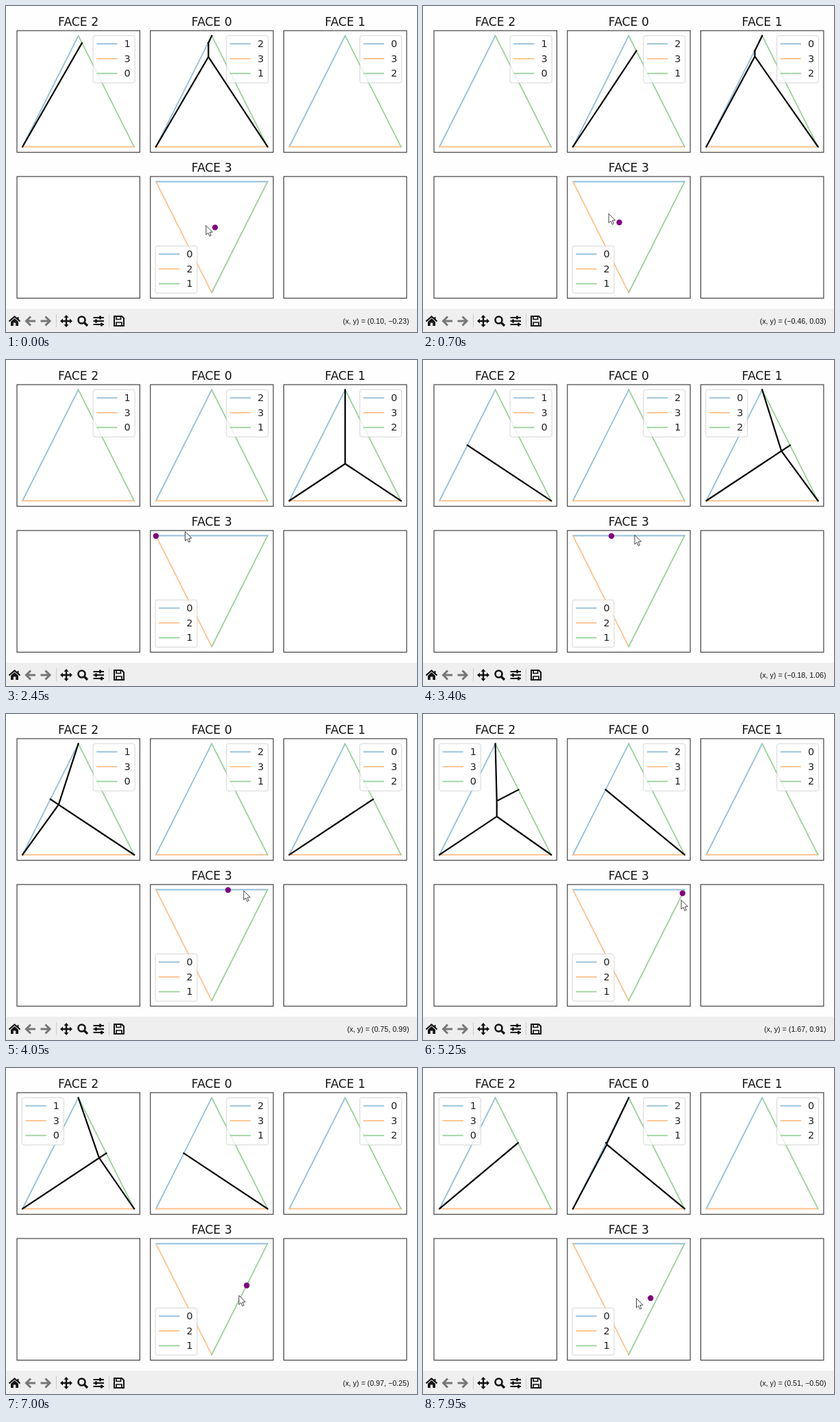
These frames come from a looping animation (600 by 476 pixels, 8 s). An HTML page:

```html
<!DOCTYPE html>
<html lang="en">
<head>
<meta charset="utf-8">
<title>Cut locus on a tetrahedron</title>
<style>
  html, body { margin: 0; width: 100%; height: 100%; overflow: hidden; background: #fefefe; }
  svg { display: block; width: 600px; height: 476px; }
  .title { font: 17.2px "DejaVu Sans", sans-serif; text-anchor: middle; fill: #151515; }
  .key { font: 14.4px "DejaVu Sans", sans-serif; fill: #222; }
  .coords { font: 10.7px "Liberation Sans", Arial, sans-serif; text-anchor: end; fill: #111; }
  .edge { stroke-width: 1.8; stroke-linecap: square; }
  .cut { fill: none; stroke: #000; stroke-width: 2.2; stroke-linecap: square; }
</style>
</head>
<body>
<svg viewBox="0 0 600 476">
  <g id="plots"></g>
  <rect y="442" width="600" height="34" fill="#efefef"/>
  <g fill="none" stroke="#111" stroke-width="2">
    <path d="M4.5 460.5L12.5 453.5L20.5 460.5" stroke-width="2.2"/>
    <path d="M7 461L12.5 456L18 461V467H14.3V462.5H10.7V467H7Z" fill="#111" stroke="none"/>
    <path d="M17.5 454V458"/>
    <g stroke="#777" stroke-width="3">
      <path d="M36 453.5L29.5 460L36 466.5M30 460H43"/>
      <path d="M57.5 453.5L64 460L57.5 466.5M63.5 460H50.5"/>
    </g>
    <path d="M73.5 450V469M150.5 450V469" stroke="#ccc" stroke-width="1"/>
    <path d="M88 454V466M82 460H94" stroke-width="2.4"/>
    <path d="M88 451l3.5 4h-7zM88 469l3.5 -4h-7zM79 460l4 -3.5v7zM97 460l-4 -3.5v7z" fill="#111" stroke="none"/>
    <circle cx="110.5" cy="458.5" r="5" stroke-width="2.6"/>
    <path d="M114.5 462.5L119 467" stroke-width="3.2"/>
    <path d="M127.5 455H143M127.5 460H143M127.5 465H143" stroke-width="1.8"/>
    <path d="M137.5 452.5V457.5M131.5 457.5V462.5M139.5 462.5V467.5" stroke-width="2.8"/>
    <path d="M158 453H169L172 456V467H158Z"/>
    <path d="M161 453.5V457.5H167.5V453.5M161 467V462H169V467" stroke-width="1.7"/>
  </g>
  <text id="coords" class="coords" x="588.5" y="463.5"></text>
  <path id="cursor" d="M0 0V13.5L3.1 10.7L5.2 15.6L7.4 14.6L5.3 9.9L9.5 9.6Z"
        fill="#fff" stroke="#444" stroke-width="1"/>
</svg>
<script>
const LOOP = 8000, STEP = 50, LAG = 250, SLOW = 240.9;
const R3 = Math.sqrt(3), SX = 163 / (2 * R3), SY = 54;
const COLORS = ['#93bedb', '#ffc28b', '#99d199'];
const AXES = { w: 179.4, h: 177.6 }, BOX = { w: 61, h: 69 }, PAD = 7.3;

// One pointer path [time, x, y]: the cursor runs ahead of it, the dot behind
const path = [[0, 305.2, 323.4], [250, 292, 320.5], [1150, 264.2, 297.6], [1400, 243.6, 290.5],
  [1650, 212.5, 259], [2200, 202, 250], [2450, 222, 246], [2700, 261.5, 250.5], [2900, 263, 251],
  [3800, 324.2, 257], [4300, 347, 258], [5000, 378.85, 261.8], [5250, 378.85, 261.8],
  [5500, 377, 271.5], [6750, 352, 317.5], [7250, 340, 332], [7700, 332.3, 336],
  [7950, 324.5, 338], [8200, 311.5, 336.5]];

const column = i => 16 + 194.75 * i;
const third = 2 * Math.PI / 3;
// Faces: column, edge names, centre and turn of the unfolded triangle
const faces = [
  { id: 2, ax: column(0), ay: 36, keys: [1, 3, 0], c: [-R3, -1], turn: -third },
  { id: 0, ax: column(1), ay: 36, keys: [2, 3, 1], c: [0, 2], turn: 0 },
  { id: 1, ax: column(2), ay: 36, keys: [0, 3, 2], c: [R3, -1], turn: third }
];
const base = { id: 3, ax: column(1), ay: 249, keys: [0, 2, 1], down: true };

const $ = id => document.getElementById(id);
function add(parent, tag, attrs, text) {
  const el = document.createElementNS('http://www.w3.org/2000/svg', tag);
  for (const k in attrs) el.setAttribute(k, attrs[k]);
  if (text !== undefined) el.textContent = text;
  return parent.appendChild(el);
}
const move = (el, x, y) => el.setAttribute('transform', `translate(${x.toFixed(2)} ${y.toFixed(2)})`);

function drawAxes(x, y) {
  add($('plots'), 'rect', {
    x, y, width: AXES.w, height: AXES.h, fill: '#fff', stroke: '#3c3c3c', 'stroke-width': 1.15
  });
}

function build(f) {
  const g = $('plots'), cx = f.ax + 89.6, top = f.ay + 7.5, bottom = f.ay + 169.5;
  drawAxes(f.ax, f.ay);
  add(g, 'text', { class: 'title', x: cx, y: f.ay - 7 }, 'FACE ' + f.id);
  const flat = f.down ? top : bottom;
  const l = [cx - 81.5, flat], r = [cx + 81.5, flat], tip = [cx, f.down ? bottom : top];
  f.edges = f.down ? [[l, r], [l, tip], [tip, r]] : [[l, tip], [l, r], [tip, r]];
  f.cx = cx;
  f.cy = f.down ? top + 54.5 : top + 108;
  f.edges.forEach(([a, b], i) => add(g, 'path', { class: 'edge', d: `M${a}L${b}`, stroke: COLORS[i] }));
  if (!f.down) f.cut = add(g, 'path', { class: 'cut' });
  f.legend = add(g, 'g', {});
  add(f.legend, 'rect', { width: BOX.w, height: BOX.h, rx: 3, fill: '#fff', stroke: '#ccc', opacity: .8 });
  f.keys.forEach((k, i) => {
    const y = 12 + i * 21.6;
    add(f.legend, 'path', { class: 'edge', d: `M6 ${y}H34.5`, stroke: COLORS[i] });
    add(f.legend, 'text', { class: 'key', x: 45.5, y: y + 5 }, k);
  });
  placeLegend(f, []);
}

// Part of the line p + t*d inside all half planes n.x <= k, from t0 to t1
function clip(p, d, planes, t0, t1) {
  for (const [nx, ny, k] of planes) {
    const slope = nx * d[0] + ny * d[1], room = k - nx * p[0] - ny * p[1];
    if (Math.abs(slope) < 1e-9) { if (room < -1e-7) return null; }
    else if (slope > 0) t1 = Math.min(t1, room / slope);
    else t0 = Math.max(t0, room / slope);
    if (t0 >= t1) return null;
  }
  return [t0, t1];
}

// Puts the legend where it covers the fewest lines
function placeLegend(f, segs) {
  const spots = (start, size, box) => [start + PAD, start + (size - box) / 2, start + size - PAD - box];
  const xs = spots(f.ax, AXES.w, BOX.w), ys = spots(f.ay, AXES.h, BOX.h);
  const order = [[2, 0], [0, 0], [0, 2], [2, 2], [2, 1], [0, 1], [1, 2], [1, 0], [1, 1]];
  let best = null;
  for (const [i, j] of order) {
    const x = xs[i], y = ys[j];
    const sides = [[1, 0, x + BOX.w], [-1, 0, -x], [0, 1, y + BOX.h], [0, -1, -y]];
    const inside = p => sides.every(([a, b, k]) => a * p[0] + b * p[1] <= k);
    let cost = 0;
    for (const [a, b] of f.edges.concat(segs)) {
      if (clip(a, [b[0] - a[0], b[1] - a[1]], sides, 0, 1)) cost++;
      cost += inside(a) + inside(b);
    }
    if (!best || cost < best.cost) best = { cost, x, y };
  }
  move(f.legend, best.x, best.y);
}

// All images of p in the unfolded plane near a face, in that face's own frame
function images(p, f) {
  const co = Math.cos(f.turn), si = Math.sin(f.turn), out = [];
  for (let m = -3; m <= 3; m++) for (let n = -3; n <= 3; n++) {
    const tx = 4 * R3 * m + 2 * R3 * n, ty = 6 * n;
    for (const [qx, qy] of [p, [-p[0], -4 - p[1]]]) {
      const x = qx + tx - f.c[0], y = qy + ty - f.c[1];
      if (Math.hypot(x, y) > 7.5) continue;
      const s = [co * x - si * y, si * x + co * y];
      if (out.every(o => Math.hypot(o[0] - s[0], o[1] - s[1]) > .02)) out.push(s);
    }
  }
  return out;
}

const TRIANGLE = [[0, -1, 1], [R3 / 2, .5, 1], [-R3 / 2, .5, 1]];
const closer = (a, b) => [b[0] - a[0], b[1] - a[1], (b[0] ** 2 + b[1] ** 2 - a[0] ** 2 - a[1] ** 2) / 2];

// Voronoi edges of the images inside the face: points with two shortest paths
function cutLocus(p, f) {
  const sites = images(p, f), segs = [];
  sites.forEach((a, i) => sites.slice(i + 1).forEach(b => {
    const mid = [(a[0] + b[0]) / 2, (a[1] + b[1]) / 2];
    const len = Math.hypot(b[0] - a[0], b[1] - a[1]);
    const d = [(a[1] - b[1]) / len, (b[0] - a[0]) / len];
    const rest = sites.filter(s => s !== a && s !== b).map(s => closer(a, s));
    const range = clip(mid, d, TRIANGLE.concat(rest), -20, 20);
    if (!range || range[1] - range[0] < .003) return;
    segs.push(range.map(t => [f.cx + SX * (mid[0] + d[0] * t), f.cy - SY * (mid[1] + d[1] * t)]));
  }));
  return segs;
}

function pointer(t) {
  const i = Math.max(1, path.findIndex(k => k[0] >= t));
  const [t0, x0, y0] = path[i - 1], [t1, x1, y1] = path[i];
  const u = Math.max(0, (t - t0) / (t1 - t0));
  return [x0 + (x1 - x0) * u, y0 + (y1 - y0) * u];
}

// Redraws are smooth in bursts and slow in between
function stepTime(t) {
  const s = Math.floor(t / STEP) * STEP;
  const smooth = s < 200 || (s >= 1500 && s < 2605) || s >= 4700;
  return smooth ? s : 1400 + Math.floor((s - 1400) / SLOW) * SLOW;
}

const toData = ([x, y]) => [(x - base.cx) / SX, (base.cy - y) / SY];
function intoTriangle([x, y]) {
  y = Math.min(1, y);
  const half = (y + 2) / R3;
  return [Math.max(-half, Math.min(half, x)), y];
}
const num = v => v.toFixed(2).replace('-', '\u2212');
const pt = p => p[0].toFixed(2) + ' ' + p[1].toFixed(2);

[...faces, base].forEach(build);
drawAxes(column(0), base.ay);
drawAxes(column(2), base.ay);
const dot = add($('plots'), 'circle', { r: 4.2, fill: '#800080' });

function draw(t) {
  const p = intoTriangle(toData(pointer(t - LAG)));
  move(dot, base.cx + p[0] * SX, base.cy - p[1] * SY);
  for (const f of faces) {
    const segs = cutLocus(p, f);
    f.cut.setAttribute('d', segs.map(([a, b]) => `M${pt(a)}L${pt(b)}`).join(''));
    placeLegend(f, segs);
  }
  move($('cursor'), ...pointer(t + LAG));
  const at = pointer(t), [x, y] = toData(at);
  const over = at[0] > base.ax && at[1] > base.ay;
  $('coords').textContent = over ? `(x, y) = (${num(x)}, ${num(y)})` : '';
}

let shown = -1;
const start = performance.now();
function tick(now) {
  const t = stepTime(Math.max(0, now - start) % LOOP);
  if (t !== shown) draw(shown = t);
  requestAnimationFrame(tick);
}
tick(start);
</script>
</body>
</html>
```
